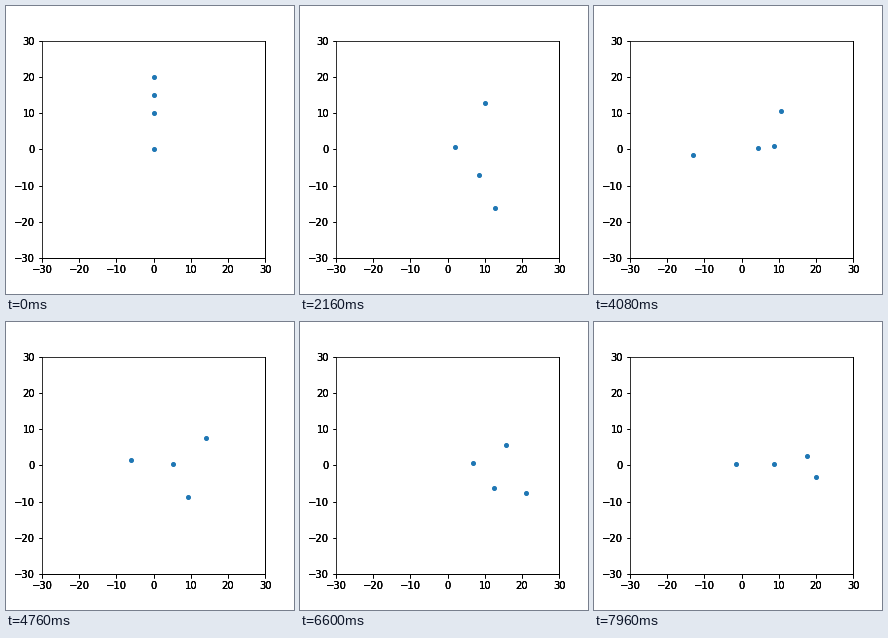
These frames come from a looping animation (288x288 px, 8000 ms). A matplotlib script:

```python
import numpy as np
import matplotlib.pyplot as plt
from matplotlib.animation import FuncAnimation

FRAMES, INTERVAL = 200, 40
SUBSTEPS = 40
GM = 6.67
mass = np.array([1.0, 0.01, 0.01, 0.01])

plt.rcParams.update({"font.family": "DejaVu Sans", "font.size": 10})


def accel(pos):
    """Pairwise attraction falling off as 1/r."""
    gap = pos[None] - pos[:, None]
    dist2 = (gap ** 2).sum(axis=2) + np.eye(len(pos))
    return GM * (gap * (mass / dist2)[..., None]).sum(axis=1)


def rk4(pos, vel, dt):
    k1 = accel(pos)
    v2 = vel + k1 * dt / 2
    k2 = accel(pos + vel * dt / 2)
    v3 = vel + k2 * dt / 2
    k3 = accel(pos + v2 * dt / 2)
    v4 = vel + k3 * dt
    k4 = accel(pos + v3 * dt)
    return (pos + (vel + 2 * v2 + 2 * v3 + v4) * dt / 6,
            vel + (k1 + 2 * k2 + 2 * k3 + k4) * dt / 6)


def simulate():
    pos = np.array([[0, 0], [0, 10], [0, 15], [0, 20]], float)
    vel = np.array([[0, 0], [1, 0], [1.5, 0], [2, 0]], float)
    track = [pos]
    for _ in range(FRAMES - 1):
        for _ in range(SUBSTEPS):
            pos, vel = rk4(pos, vel, 1 / SUBSTEPS)
        track.append(pos)
    return np.array(track)


def add_axes(fig):
    ax = fig.add_axes([0.125, 0.125, 0.775, 0.755])
    ax.set(xlim=(-30, 30), ylim=(-30, 30))
    ax.set_xticks(range(-30, 31, 10))
    ax.set_yticks(range(-30, 31, 10))
    return ax


fig = plt.figure(figsize=(4, 4), dpi=72, facecolor="white")
# Stacked axes give the heavy tick labels and frame.
ax = [add_axes(fig) for _ in range(3)][-1]
dots, = ax.plot([], [], "o", ms=4, color="#1f77b4")
track = simulate()


def update(i):
    dots.set_data(track[i, :, 0], track[i, :, 1])
    return dots,


anim = FuncAnimation(fig, update, frames=FRAMES, interval=INTERVAL,
                     repeat=True, repeat_delay=0)
plt.show()
```
